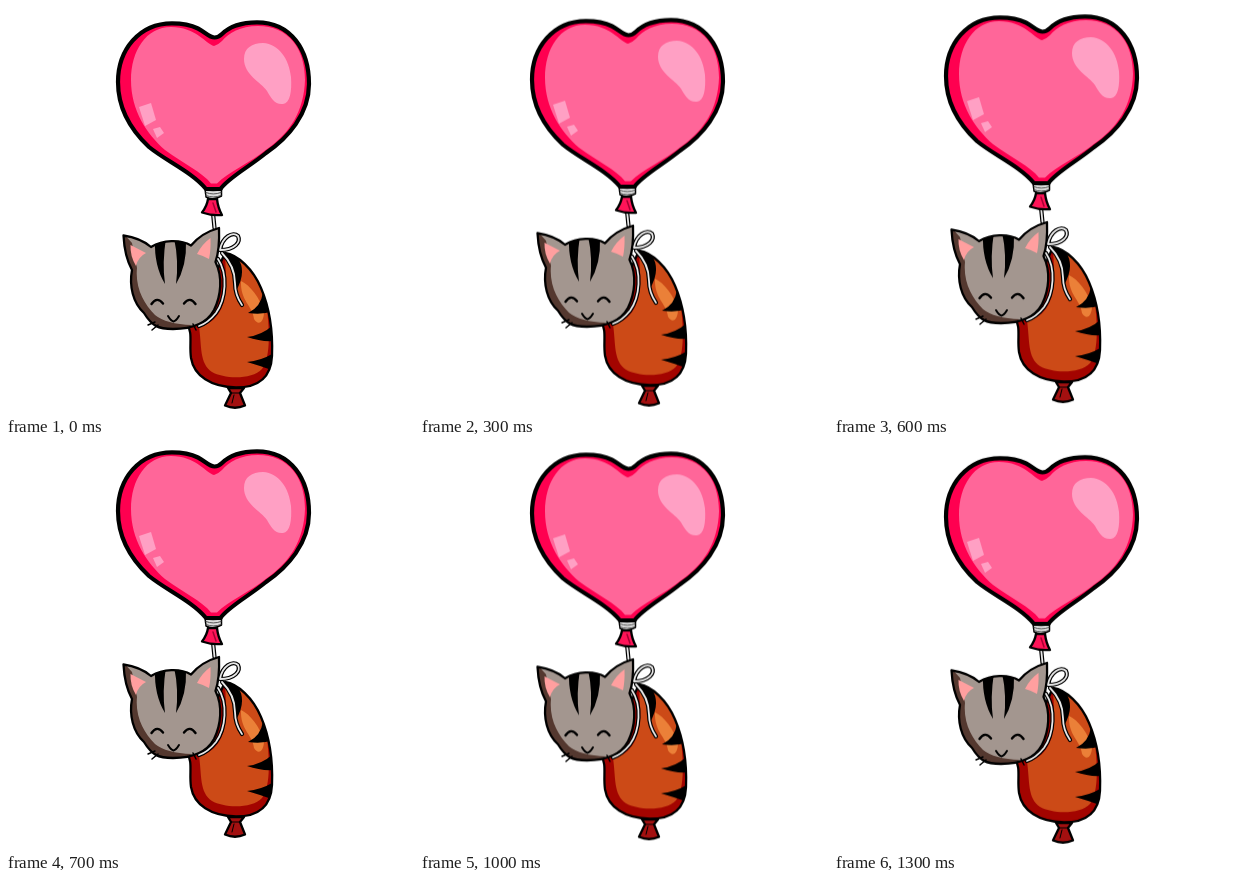
Write an HTML page that moves like this. It is 408x408 px and loops after 1.4 s.

```html
<!DOCTYPE html>
<html lang="en">
<head>
<meta charset="utf-8">
<title>Cat balloon</title>
<style>
html, body { margin: 0; width: 100%; height: 100%; overflow: hidden; background: #fff; }
svg { display: block; width: 408px; height: 408px; }
.ink { stroke: #000; stroke-width: 2.3; stroke-linejoin: round; stroke-linecap: round; }
.line { fill: none; stroke-linecap: round; stroke-linejoin: round; }
.cord-edge { stroke: #000; stroke-width: 4.2; }
.cord { stroke: #e8e8e8; stroke-width: 1.8; }
</style>
</head>
<body>
<svg viewBox="0 0 408 408">
  <defs>
    <path id="heart" d="M208.500 31.500C203 31.500 199 26 192 22.500C184 18.500 176 17.300 166 17.300C133 17.300 112 44 112 76C112 104 127 126 143 141C160 155 186 166 200 183H214.500C222 172 243 161 260 147C282 132 303 108 303 78C303 44 285 16.300 251 16.300C234 16.300 222 22 216 28C213 31 211 31.500 208.500 31.500Z"/>
    <path id="body" d="M181 319C187 326 183 338 185 352C188 370 205 381 230 381.500C252 381.500 265 372 266 350C267 325 264 303 255 282C247 263 232 249 219 247L204 280Z"/>
    <path id="head" d="M117.500 229.500C128 231 138 235 145 241C157 234 174 233 185 239.500C192 231 202 225 213 222C213.500 235 213 246 209.500 256C217 271 215 290 208 304C201 317 186 323 167 323C152 323 146 320 138 307C127 297 123 280 126 264C120 253 118 240 117.500 229.500Z"/>
    <clipPath id="inHeart"><use href="#heart"/></clipPath>
    <clipPath id="inBody"><use href="#body"/></clipPath>
    <clipPath id="inHead"><use href="#head"/></clipPath>
    <path id="collar" d="M212 253C222 268 220 293 210 307Q202 317 193 320"/>
    <path id="drop" d="M216 247C225 256 229 267 229 277Q229 289 236 299"/>
    <path id="bow" d="M214 244C216 231 227 225 232 230C235 236 229 244 214 244"/>
    <path id="lead" d="M207 207L208.500 222"/>
  </defs>

  <g id="float">
    <g id="tailKnot">
      <path class="ink" fill="#a31010" d="M222 382H238L234 387L239 399.500Q229 404 219 399.500L225 387Z"/>
      <path class="line" stroke="#000" d="M225 387H234M228 389L226 397"/>
    </g>

    <g clip-path="url(#inBody)">
      <use href="#body" fill="#a30400"/>
      <path fill="#cc4a17" d="M219 247C245 250 258 280 261 303C264 330 264 352 256 363C246 374 218 373 206 366C193 357 196 340 193 321C211 317 222 300 220 269Z"/>
      <path fill="#eb8038" d="M235 275C244 279 254 292 258 306C258 315 253 321 248 313C247 300 234 295 235 275Z"/>
      <g fill="#000">
        <path d="M218 246L232 252Q241 266 230 285Q229 261 218 246Z"/>
        <path d="M257 286L268 305Q257 309 242 307Q255 301 257 286Z"/>
        <path d="M268 318V335Q255 336 241 331Q257 329 268 318Z"/>
        <path d="M268 347V365Q255 360 241 356Q255 355 268 347Z"/>
      </g>
    </g>
    <use href="#body" class="ink" fill="none"/>

    <use href="#lead" class="line cord-edge"/>
    <use href="#lead" class="line cord"/>

    <g clip-path="url(#inHead)">
      <use href="#head" fill="#a3968f"/>
      <path fill="#54382f" d="M116 226L126 237L131 262C129 282 138 298 149 309Q160 318 186 319L168 328L138 322L116 270Z"/>
      <path fill="#ff9f9f" d="M124.500 239L140 247Q132 251 130 260Q124 250 124.500 239Z"/>
      <path fill="#ff9f9f" d="M204.500 232Q205 244 203 253Q198 250 191 248Q196 238 204.500 232Z"/>
      <g fill="#000">
        <path d="M149 234L160 232Q156 257 159 278Q148 260 149 234Z"/>
        <path d="M168 232L180 235Q181 260 170 278Q173 255 168 232Z"/>
      </g>
    </g>
    <use href="#head" class="ink" fill="none"/>
    <g class="line" stroke="#000" stroke-width="2.400">
      <path d="M145.500 298Q151 290 157 297.500M178 297.500Q184 290 189.500 298"/>
      <path stroke-width="2" d="M162 310Q165 315 167.500 315.500Q170 315 173 310"/>
      <path stroke-width="1.500" d="M142 319L149 316M146 324L152 319M187 318L190 324"/>
    </g>

    <g class="line">
      <g class="cord-edge"><use href="#collar"/><use href="#drop"/><use href="#bow"/></g>
      <g class="cord"><use href="#collar"/><use href="#drop"/><use href="#bow"/></g>
    </g>

    <g clip-path="url(#inHeart)">
      <use href="#heart" fill="#ff0050"/>
      <path fill="#ff6699" d="M208 40C200 38 190 21 165 21C140 21 125 45 125 74C125 105 141 128 159 144C178 158 196 166 205 177.500H211C222 166 244 157 261 143C284 127 298 105 299 74C299 42 282 20 252 20C234 20 223 27 216 35Q212 39 208 40Z"/>
      <g fill="#ffa0c4">
        <path d="M238 53C238 42 246 37 257 37C273 38 283 53 285 71C286 86 284 97 277 98C269 99 265 92 261 85C255 76 238 69 238 53Z"/>
        <path d="M133 101L145 97L150 114L139 120Z"/>
        <path d="M147 123L154 121L158 127L151 132Z"/>
      </g>
    </g>
    <use href="#heart" fill="none" stroke="#000" stroke-width="4.200" stroke-linejoin="round"/>

    <path class="ink" fill="#ff1458" d="M202 193H211Q212 202 216 209Q206 210 196 206.500Q201 200 202 193Z"/>
    <path class="line" stroke="#a50032" stroke-width="1.500" d="M207 197L210 206"/>
    <path fill="#ddd" stroke="#000" stroke-width="1.500" stroke-linejoin="round" d="M199 183Q207 186 215.500 183V190Q207 195 200 191Z"/>
    <path class="line" stroke="#555" d="M200 186.500Q207 189.500 215 186.500M200 189.500Q207 192.500 215 189.500"/>
  </g>
</svg>
<script>
const loop = 1400;
const rise = 7 / 6; // px per step
// [time in ms, steps above the resting height]
const steps = [
  [0, 0], [200, 1], [300, 2], [400, 3], [500, 4], [600, 5], [700, 6],
  [900, 5], [1000, 4], [1100, 3], [1200, 2], [1300, 1], [loop, 0]
];
document.getElementById('float').animate(
  steps.map(([time, level]) => ({
    offset: time / loop,
    transform: `translateY(${-rise * level}px)`,
    easing: 'steps(1, end)'
  })),
  { duration: loop, iterations: Infinity }
);
</script>
</body>
</html>
```
